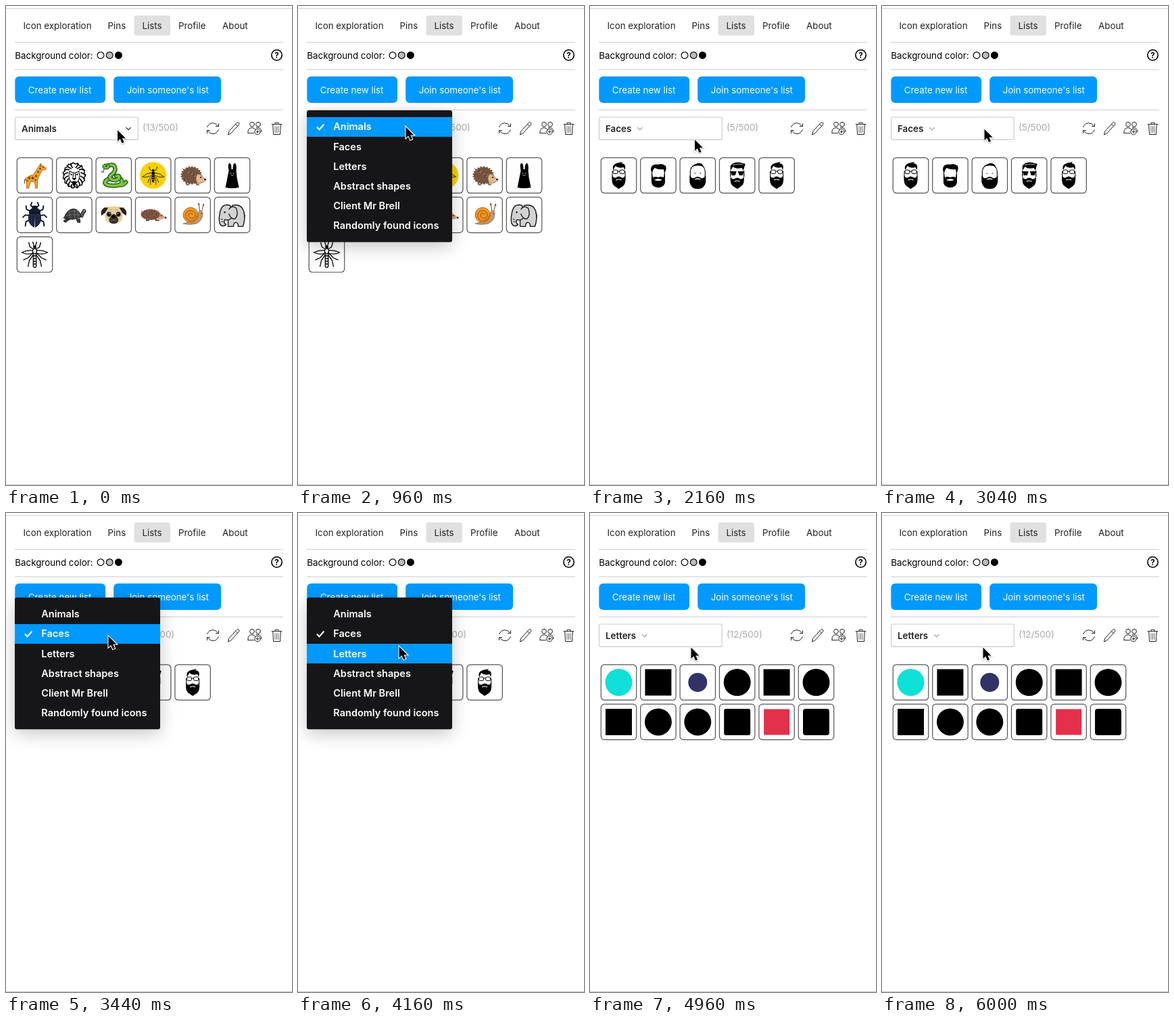
An HTML page with a canvas that plays this animation: 423 px wide and 707 px high, repeating every 6.48 s.

```html
<!DOCTYPE html>
<html lang="en">
<head>
<meta charset="utf-8">
<title>Icon lists</title>
<style>
html, body { margin: 0; width: 100%; height: 100%; overflow: hidden; background: #fff; }
canvas { display: block; width: 423px; height: 707px; }
</style>
</head>
<body>
<canvas id="stage"></canvas>
<script>
const W = 423, H = 707, LOOP = 6480, STEP = 80, ROW = 29.2;
const BLUE = '#0099ff', INK = '#000', FONT = 'Inter, sans-serif';
const canvas = document.getElementById('stage');
const ctx = canvas.getContext('2d');
const scale = window.devicePixelRatio || 1;
canvas.width = W * scale;
canvas.height = H * scale;

function path(d, fill, stroke, width = 1) {
  const p = new Path2D(d);
  if (fill) { ctx.fillStyle = fill; ctx.fill(p); }
  if (stroke) { ctx.strokeStyle = stroke; ctx.lineWidth = width; ctx.stroke(p); }
}
function paint(fill, stroke, width) {
  if (fill) { ctx.fillStyle = fill; ctx.fill(); }
  if (stroke) { ctx.strokeStyle = stroke; ctx.lineWidth = width; ctx.stroke(); }
}
function oval(x, y, rx, ry, fill, stroke, width = 1) {
  ctx.beginPath();
  ctx.ellipse(x, y, rx, ry, 0, 0, 7);
  paint(fill, stroke, width);
}
const dot = (x, y, r, fill, stroke, width) => oval(x, y, r, r, fill, stroke, width);
function box(x, y, w, h, r, fill, stroke, width = 1) {
  ctx.beginPath();
  ctx.roundRect(x, y, w, h, r);
  paint(fill, stroke, width);
}
function text(str, x, middle, color = '#222', weight = 400, size = 13.35) {
  ctx.font = `${weight} ${size}px ${FONT}`;
  ctx.fillStyle = color;
  ctx.fillText(str, x, middle + size * 0.355);
  return ctx.measureText(str).width;
}
function at(x, y, draw) {
  ctx.save();
  ctx.translate(x, y);
  draw();
  ctx.restore();
}
function both(draw) {
  draw();
  ctx.scale(-1, 1);
  draw();
  ctx.scale(-1, 1);
}
// Closed ring of alternating long and short points
function spikes(n, rx, ry, depth, fill, stroke, width = 1) {
  ctx.beginPath();
  for (let i = 0; i < n * 2; i++) {
    const a = i * Math.PI / n, k = i % 2 ? depth : 1;
    ctx.lineTo(Math.cos(a) * rx * k, Math.sin(a) * ry * k);
  }
  ctx.closePath();
  paint(fill, stroke, width);
}

function giraffe() {
  path('M-13 4Q-16 8-15 12', null, '#6b3f17', 1.2);
  path('M7-15L9-18 10-15 17-11 16-8 11-8 5 4 4 9 4 19H1L0 10-6 9-9 19H-12L-12 10-14 5Q-9 0-2-1Z', '#f4a321', '#8a5318', .7);
  [[8, -10, 1.6], [5, -5, 1.7], [2, 1, 1.8], [-3, 4, 2], [-8, 4, 1.9], [-11, 8, 1.3], [1, 7, 1.4], [9, -14, 1]]
    .forEach(([x, y, r]) => dot(x, y, r, '#80481a'));
  dot(12.5, -12, .8, INK);
}
function lion() {
  ctx.lineJoin = 'round';
  spikes(15, 17, 19, .88, '#fff', INK, 1.4);
  both(() => {
    path('M2-11Q6-15 5-18M4-10Q10-12 11-15M7-8Q12-10 15-7M9-4Q13-4 16 0M9 1Q13 2 15 6M8 5Q11 7 12 12M6 9Q9 12 8 16M3 13Q5 15 4 19', null, INK, 1.7);
    path('M1-5L2 4M2-4L7-6L8 1Q7 9 3 11', null, INK, 1.1);
    path('M2-1L6-3 5 0Z', INK);
  });
  path('M-3.5 4H3.5L0 7.5ZM-4 9Q0 8 4 9L2 14 0 18-2 14Z', INK);
}
function snake() {
  const body = 'M-11-13Q0-19 2-11Q3-6-2-2Q-9 3-3 6Q4 9 8 4Q9 0 4 1';
  const coil = 'M-4 5Q-13 6-13 11Q-11 16 2 15Q13 15 12 9Q12 6 9 5M10 14Q14 15 18 10';
  ctx.lineCap = ctx.lineJoin = 'round';
  path('M-14-10L-16-4M-16-6L-18-5', null, '#d8262c', 1.2);
  for (const d of [coil, body]) {
    path(d, null, '#174915', 6.6);
    path(d, null, '#5fb236', 4.6);
    path(d, null, '#a8cf4e', 1.2);
  }
  oval(-11, -13, 5.5, 4, '#69b936', '#174915');
  dot(-11, -14, 1.1, INK);
}
function wasp() {
  dot(0, 0, 19.7, '#f9d000');
  both(() => {
    path('M1-4Q9-4 16 2Q9 4 1-1Z', null, INK, .8);
    path('M1-6L5-9 6-13M1 0L6 5 8 11M1 1L4 7 4 14', null, INK, .8);
  });
  oval(0, -7.5, 1.8, 1.8, INK);
  oval(0, -3, 2.2, 2.8, INK);
  oval(0, 5, 1.9, 5.5, INK);
  path('M-2 3.5H2M-2 6.5H2', null, '#f9d000', .8);
}
function hedgehog() {
  path('M-10 10L-9 14H-5M5 10L6 14H10', '#c99b75', '#5c3b29', 1.1);
  at(-2, 0, () => spikes(21, 16.5, 14, .84, '#74543f'));
  for (let i = 0; i < 30; i++) {
    const x = -13 + i * 7 % 23, y = -8 + i * 5 % 17;
    path(`M${x} ${y}l-2.5-2.5`, null, i % 2 ? '#b08c6c' : '#4d3426', .8);
  }
  path('M7-2Q13-2 15 3L19 6Q18 11 8 12Q2 6 7-2Z', '#e6b98d', '#74543f', .7);
  dot(12, 3, 1, INK);
  dot(18.5, 6, 1.3, INK);
}
function rabbit() {
  path('M-5-7Q-7-18-4-18Q-1-18-1-9H1Q1-18 4-18Q7-17 6-7L7 3 10 18Q0 20-10 18L-7 3Z', INK);
  both(() => dot(2, -3, .7, '#fff'));
  path('M-2 0H2', null, '#fff', .7);
}
function beetle() {
  ctx.lineJoin = 'round';
  both(() => {
    path('M5-5L12-8 13-14M7 1L14 0 18 4M7 7L13 10 14 17M2-11L6-14 4-19', null, '#11172a', 1.9);
    path('M.3-2H8Q12 12 1 18Z', '#202f52', '#080d1b', 1);
    path('M3 1V14M6 1V11', null, '#0f1932', 1);
  });
  path('M-8-3Q-8-10 0-10Q8-10 8-3Z', '#131d38', INK, 1);
  oval(0, -11, 4.2, 3, '#11172a');
}
function turtle() {
  path('M-11 5L-16 9-13 11-6 6M3 6L5 11H9L8 5M-15 3L-17 5', '#3c3c3c', '#222', 1);
  path('M8 1L12-6Q14-10 17-7Q18-4 15-2L12 4Z', '#555', '#222', 1);
  path('M-15 5Q-11-9 0-9Q8-7 10 3Q-3 9-15 5Z', '#3a3a3a', '#191919', 1);
  path('M-12 1Q-2-2 9 0M-8-5L-5 6M0-9L1 6M-8-5L5-6M5-6L6 5', null, '#888', .7);
  dot(15, -6, .7, '#fff');
}
function pug() {
  path('M-11-11Q0-15 11-11Q16 0 11 9Q0 16-11 9Q-16 0-11-11Z', '#e9cfa0');
  both(() => {
    path('M8-11L14-11Q21-6 18 1L13-3Z', '#26211f');
    oval(7, -1, 3.5, 3.8, '#51433a');
    dot(7, -1, 2.4, INK);
    dot(6, -2, .7, '#fff');
    path('M2-8L6-7M2-5L4-4', null, '#a98b65', .8);
  });
  path('M-3 0Q0-3 3 0L7 6Q7 13 0 13Q-7 13-7 6Z', '#3a322f');
  oval(0, 2.5, 3, 2, INK);
  path('M-4 9Q0 6 4 9', null, '#8a7868', .8);
}
function smallHedgehog() {
  path('M-10 5V8H-6M4 5V8H9', null, '#5a382d', 1.8);
  path('M9-4Q15 0 19 4Q14 7 6 7Z', '#d8a887');
  at(-4, -.5, () => spikes(22, 15, 8.5, .89, '#805342'));
  for (let i = 0; i < 18; i++) path(`M${-16 + i * 7 % 24} ${-5 + i * 5 % 11}l-2-1`, null, '#5c3b30', .8);
  dot(12, 1, .9, INK);
  dot(18.5, 4, 1.2, INK);
}
function snail() {
  ctx.lineCap = 'round';
  path('M11-4L9-16M13-4L16-15', null, '#8f613d', 1.2);
  dot(9, -16, 1.2, '#60402c');
  dot(16, -15, 1.2, '#60402c');
  path('M-14 13Q0 8 7 4L9-5Q13-8 15-3Q15 9 5 13Q-5 15-14 13Z', '#c4986c', '#87613f', .7);
  dot(-3, 0, 11, '#f19b24', '#b5631a', 1);
  path('M7 1Q3 11-6 8Q-13 3-9-4Q-3-9 3-4Q6 3-1 5Q-7 4-6-1Q-3-4 0-1', null, '#c0691a', 1.6);
  dot(13, -2, .6, INK);
}
function elephant() {
  const skin = '#d2d2d2', edge = '#171717';
  ctx.lineJoin = 'round';
  path('M0-14Q13-17 17-6Q20 5 16 17H9Q9 11 5 11Q2 12 2 17H-6V6Z', skin, edge, 1.4);
  path('M-3-14Q-15-18-18-4Q-21 10-17 15Q-13 18-9 14Q-13 12-11 7Q-4 9 0 3Z', skin, edge, 1.4);
  path('M-5-8Q0-15 6-10Q10 0 4 6Q-2 6-5-2', skin, edge, 1.3);
  path('M17-4Q20 0 18 6M-17 6L-14 7M-16 10L-13 10', null, edge, 1);
  dot(-11, -4, 1.2, INK);
}
function mosquito() {
  both(() => {
    path('M2-6Q11-7 19-3Q12 1 2-2Z', '#fff', INK, 1.1);
    path('M2-8L7-11 9-18M2-3L10 5 17 8M2 0L8 9 10 18M1-12L3-19', null, INK, 1.3);
  });
  box(-2.2, -2, 4.4, 21, 2.2, '#fff', INK, 1.3);
  path('M-2 2H2M-2 6H2M-2 10H2M-2 14H2', null, INK, 1.4);
  oval(0, -5, 3, 4, '#fff', INK, 1.3);
  dot(0, -11, 2.4, INK);
}

function beard(top) {
  path(`M-10 ${top}Q-7 ${top + 5}-4 ${top + 3}Q0 ${top} 4 ${top + 3}Q7 ${top + 5} 10 ${top}Q11 13 6 16L0 20-6 16Q-11 13-10 ${top}Z`, INK);
  path(`M-4 ${top + 7}Q0 ${top + 5} 4 ${top + 7}`, null, '#fff', 1.2);
}
function glassesFace() {
  path('M-8-8Q-11-15-3-18L6-20 4-18Q12-17 9-8L7-12Q-1-10-5-14Z', INK);
  both(() => {
    box(1.5, -8, 7, 5.5, 2, '#fff', INK, 1);
    path('M8.5-6H9.5V2', null, INK, 1);
  });
  path('M-2-6H2', null, INK, 1);
  beard(0);
}
function thickHairFace() {
  path('M-9-3Q-12-8-10-13Q-7-17 0-16Q6-18 11-14Q13-9 9-3L8-9Q0-8-5-11Q-8-9-9-3Z', INK);
  path('M-9-4H-10V11Q-8 18 0 18Q8 18 10 11V-4H9L8 3Q4 1 0 3Q-4 1-8 3Z', INK);
  path('M-6 7Q0 3 6 7Q0 9-6 7Z', '#fff');
}
function roundFace() {
  path('M-11 3V-7Q-9-16 0-16Q10-16 11-6V3', '#fff', INK, 1.1);
  path('M-8-13Q-1-20 6-17L9-13Q0-16-8-13Z', INK);
  both(() => dot(4, -3, .8, INK));
  path('M-12 0Q-9 5-5 4Q0 0 5 4Q9 5 12 0V10Q10 20 0 20Q-10 20-12 10Z', INK);
  path('M-4 6Q0 4 4 6', null, '#fff', 1.3);
}
function sunglassesFace() {
  path('M-10-7L-10-14Q-6-20 4-19L12-17 9-7 7-11Q-3-9-6-13Z', INK);
  path('M-7-15Q0-18 9-16', null, '#fff', .7);
  both(() => {
    path('M1-6H10L8 0H3Z', INK);
    path('M10-7V2', null, INK, 1.2);
  });
  beard(2);
}

const circle = (color, r = 20) => () => dot(0, 0, r, color);
const square = (color, s = 39, r = 0) => () => box(-s / 2, -s / 2, s, s, r, color);
const lists = {
  Animals: [giraffe, lion, snake, wasp, hedgehog, rabbit, beetle, turtle, pug, smallHedgehog, snail, elephant, mosquito],
  Faces: [glassesFace, thickHairFace, roundFace, sunglassesFace, glassesFace],
  Letters: [circle('#0de0d6'), square(INK), circle('#303268', 14), circle(INK), square(INK), circle(INK),
    square(INK), circle(INK), circle(INK), square(INK, 39, 3), square('#e5304b', 38), square(INK, 39, 4)]
};
const options = [...Object.keys(lists), 'Abstract shapes', 'Client Mr Brell', 'Randomly found icons'];

function toolIcons() {
  const gray = '#222';
  ctx.lineCap = ctx.lineJoin = 'round';
  at(306, 180.7, () => {
    const half = 'M-8.3-2Q-6-8 0-8Q5-8 8-3M8.5-7V-3H4.5';
    path(half, null, gray);
    ctx.rotate(Math.PI);
    path(half, null, gray);
  });
  at(336.5, 180.7, () => path('M-8 9L-6.5 4 4.5-8Q6-10 7.8-8.5T7.5-5L-3.5 7ZM3-6.2L6-3.4', null, gray));
  at(368, 180.7, () => {
    dot(-4, -6, 3.4, null, gray);
    dot(5, -6, 3.4, null, gray);
    path('M-10 7V4Q-9-1-4-1Q0-1 1 2M2-1Q9-3 10 5M-10 7H-1', null, gray);
    dot(4, 5, 4.2, '#fff', gray);
    path('M2 5H6M4 3V7', null, gray);
  });
  at(400.5, 180.7, () => {
    path('M-7.5-6H7.5M-2.5-6V-8.5H2.5V-6M-5.8-6L-5 8.8H5L5.8-6', null, gray);
    path('M-2.5-3V6M0-3V6M2.5-3V6', null, gray, .7);
  });
}

function page(label, items) {
  ctx.fillStyle = '#fff';
  ctx.fillRect(0, 0, W, H);
  ctx.fillStyle = '#d9d9d9';
  ctx.fillRect(0, 3, W, 1.3);
  [53, 93.3, 152.7].forEach(y => ctx.fillRect(13, y, 397, 1.4));
  ctx.fillStyle = '#c8c8c8';
  ctx.fillRect(0, 706, W, 1);

  box(189.5, 14, 53.5, 29.5, 3, '#e0e0e0');
  [['Icon exploration', 25.5], ['Pins', 150.5], ['Lists', 201.5], ['Profile', 255], ['About', 320]]
    .forEach(([name, x]) => text(name, x, 29));
  text('Background color:', 13.3, 73.5, INK);
  ['#fff', '#bbb', INK].forEach((c, i) => dot(140 + i * 13.2, 72.7, 4.9, c, INK, 1.2));
  dot(400.5, 72.5, 7.7, null, INK, 1.6);
  text('?', 397.2, 72.7, INK, 700, 11.5);

  box(13.3, 104, 133.7, 39, 6, BLUE);
  box(159.2, 104, 158.8, 39, 6, BLUE);
  text('Create new list', 32.7, 124, '#fff');
  text("Join someone's list", 178.7, 124, '#fff');

  box(13.6, 164, 181.6, 33.3, 2, '#fff', '#ccc', 1.2);
  const width = text(label, 23, 181, '#222', 600);
  const first = label === 'Animals';
  at(first ? 181 : 23 + width + 12.5, 181, () => path('M-3.7-1.8L0 1.8 3.7-1.8', null, first ? '#444' : '#aaa', 1.3));
  text(`(${items.length}/500)`, 202, 179.5, '#aaa');
  at(0, 0, toolIcons);

  items.forEach((icon, i) => at(42.5 + i % 6 * 58.4, 250 + Math.floor(i / 6) * 58.4, () => {
    box(-26.2, -26.2, 52.4, 52.4, 5, '#fff', '#555', 1.2);
    icon();
  }));
}

function menu(top, checked, pointerY) {
  ctx.save();
  ctx.shadowColor = 'rgba(0,0,0,.22)';
  ctx.shadowBlur = 26 * scale;
  ctx.shadowOffsetY = 7 * scale;
  box(13, top, 215, 194.5, 3, '#161618');
  ctx.restore();
  const start = top + 9.5;
  const active = Math.floor((pointerY - start) / ROW);
  ctx.fillStyle = BLUE;
  ctx.fillRect(13, Math.round(start + active * ROW), 215, 29);
  options.forEach((name, i) => text(name, 52.3, top + 24.3 + i * ROW, '#fff', 600, 14.5));
  at(33, top + 24.5 + checked * ROW, () => path('M-5 0L-1.5 4 5.5-4', null, '#fff', 2));
}

// Each move: start, end, then where the pointer lands
const moves = [[0, 640, 159.5, 178.5], [1280, 1600, 155, 197.3], [2640, 3040, 151.5, 181.8], [3760, 4240, 149.5, 198.5]];
function pointerAt(t) {
  let x = 165, y = 183.3;
  for (const [from, to, tx, ty] of moves) {
    const p = Math.min(1, Math.max(0, (t - from) / (to - from)));
    const e = p * p * (3 - 2 * p);
    x += (tx - x) * e;
    y += (ty - y) * e;
  }
  return [x, y];
}
function pointer(x, y) {
  at(x, y, () => {
    ctx.shadowColor = 'rgba(0,0,0,.3)';
    ctx.shadowBlur = 2 * scale;
    ctx.shadowOffsetY = scale;
    const arrow = 'M0 0V16.5L3.8 13 6.6 19.3 9.6 18 6.9 11.9H12Z';
    path(arrow, null, '#fff', 2.2);
    ctx.shadowColor = 'transparent';
    path(arrow, INK);
  });
}

function pick(t, second, third) {
  return options[t < second ? 0 : t < third ? 1 : 2];
}
function render(now) {
  const t = Math.floor(now % LOOP / STEP) * STEP;
  const [x, y] = pointerAt(t);
  ctx.setTransform(scale, 0, 0, scale, 0, 0);
  page(pick(t, 1840, 4640), lists[pick(t, 2000, 4880)]);
  if (t >= 800 && t < 1840) menu(154, 0, y);
  if (t >= 3440 && t < 4640) menu(124.8, 1, y);
  pointer(x, y);
}

let begin;
function tick(now) {
  begin ??= now;
  render(Math.max(0, now - begin));
  requestAnimationFrame(tick);
}
render(0);
requestAnimationFrame(tick);
</script>
</body>
</html>
```
